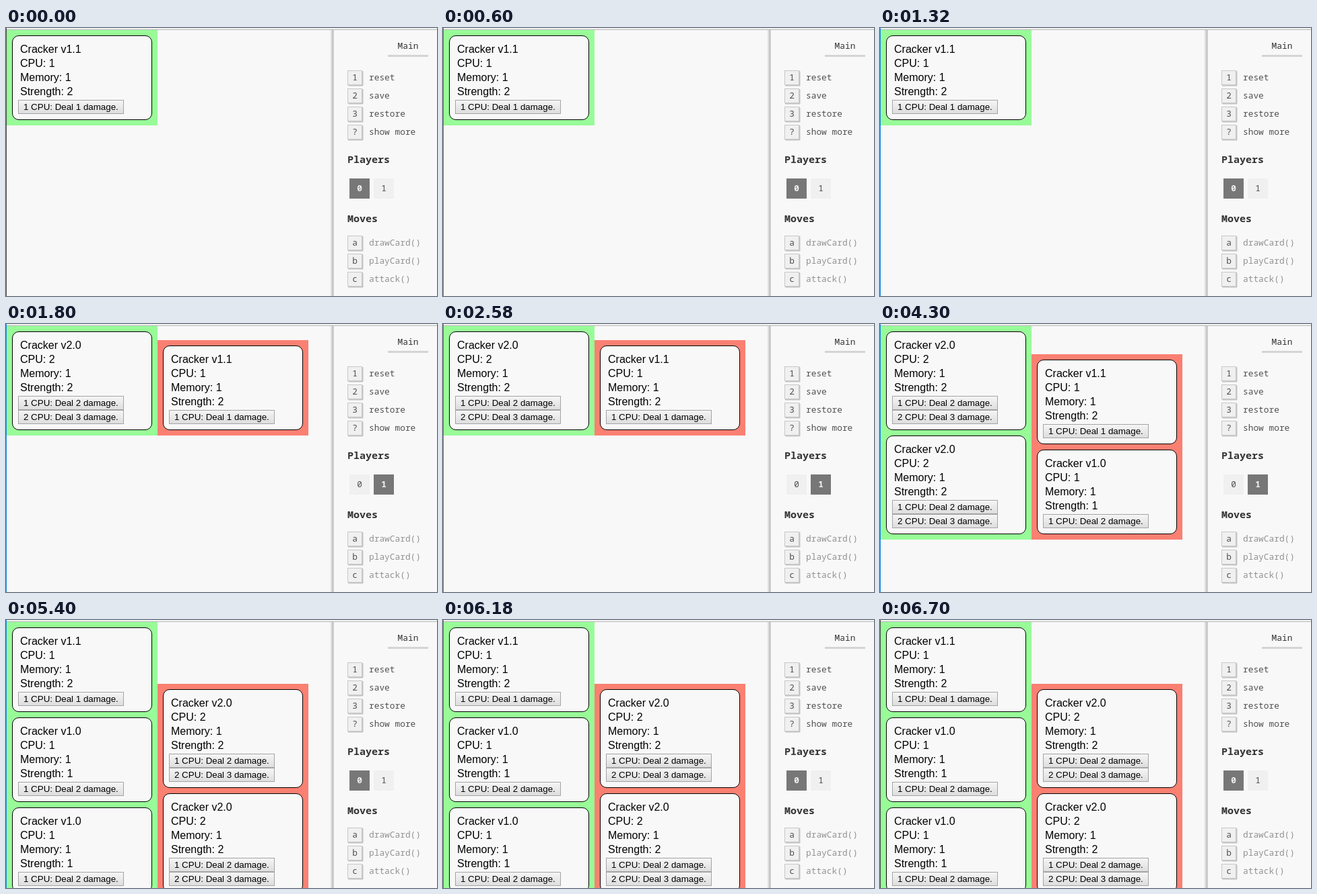
An HTML page for the animation above (7.4 s loop, 640 by 399 pixels).

```html
<!DOCTYPE html>
<html lang="en">
<head>
<meta charset="utf-8">
<title>Cracker card duel</title>
<style>
  html, body { margin: 0; width: 100%; height: 100%; overflow: hidden; background: #f8f8f8; }
  svg { display: block; position: absolute; left: 0; top: 0; }
  text { white-space: pre; }
  .card { font: 16px "Liberation Sans", Arial, sans-serif; fill: #000; }
  .btn { font: 13.333px "Liberation Sans", Arial, sans-serif; fill: #000; }
  .mono { font: 12.83px "Noto Sans Mono", monospace; fill: #505050; }
  .dim { fill: #929292; }
  .dark { fill: #333; }
  .mid { text-anchor: middle; }
  .head { font: bold 15px "Noto Sans Mono", monospace; fill: #333; }
  .on { font-weight: bold; fill: #f1f1f1; }
</style>
</head>
<body>
<svg width="640" height="399" viewBox="0 0 640 399">
  <defs>
    <linearGradient id="face" x2="0" y2="1">
      <stop stop-color="#f6f6f6"/><stop offset="1" stop-color="#dddddd"/>
    </linearGradient>
    <linearGradient id="shade">
      <stop stop-color="#f8f8f8"/><stop offset="1" stop-color="#bcbcbc"/>
    </linearGradient>
  </defs>
  <g id="board"></g>
  <g id="panel"></g>
  <g id="players"></g>
  <rect width="640" height="2" fill="#f2f2f2"/>
  <rect y="2" width="640" height="1" fill="#b8b8b8"/>
  <rect id="edge" width="1" height="399"/>
</svg>
<script>
const LOOP = 7400, TOP = 3, PAD = 8, COL = 224;
const GREEN = '#98fb98', SALMON = '#fa8072';
const DARK = '#484848', BLUE = '#1883d7';

// version: [cpu, strength, damage of each button]
const KINDS = {
  '1.0': [1, 1, [2]],
  '1.1': [1, 2, [1]],
  '2.0': [2, 2, [2, 3]]
};

// [start ms, edge colour, active player, left column, right column]
const STEPS = [
  [0, DARK, 0, ['1.1'], []],
  [600, BLUE, 0, ['1.1'], []],
  [1800, BLUE, 1, ['2.0'], ['1.1']],
  [3100, BLUE, 0, ['1.1', '1.0'], ['2.0']],
  [4300, BLUE, 1, ['2.0', '2.0'], ['1.1', '1.0']],
  [5400, BLUE, 0, ['1.1', '1.0', '1.0'], ['2.0', '2.0']],
  [6700, DARK, 0, ['1.1', '1.0', '1.0'], ['2.0', '2.0']]
];

const el = id => document.getElementById(id);
const rect = (x, y, w, h, fill, extra = '') =>
  `<rect x="${x}" y="${y}" width="${w}" height="${h}" fill="${fill}" ${extra}/>`;
const text = (x, y, cls, str) => `<text x="${x}" y="${y}" class="${cls}">${str}</text>`;

const cardHeight = v => 105 + 21 * KINDS[v][2].length;
const colHeight = list => list.reduce((sum, v) => sum + cardHeight(v) + PAD, PAD);

function card(x, y, v) {
  const [cpu, strength, hits] = KINDS[v];
  const lines = [`Cracker v${v}`, `CPU: ${cpu}`, 'Memory: 1', `Strength: ${strength}`];
  let out = rect(x + .5, y + .5, 207, cardHeight(v) - 1, '#f8f8f8', 'rx="9.5" stroke="#000"');
  lines.forEach((s, i) => out += text(x + 12, y + 26 + 21 * i, 'card', s));
  hits.forEach((hit, i) => {
    const top = y + 96 + 21 * i;
    out += rect(x + 9.5, top + .5, 156, 20, 'url(#face)', 'stroke="#a4a4a4"') +
      text(x + 17, top + 15, 'btn', `${i + 1} CPU: Deal ${hit} damage.`);
  });
  return out;
}

function column(x, bottom, list, color) {
  if (!list.length) return '';
  const h = colHeight(list);
  let y = bottom - h + PAD;
  let out = rect(x, bottom - h, COL, h, color);
  for (const v of list) {
    out += card(x + PAD, y, v);
    y += cardHeight(v) + PAD;
  }
  return out;
}

function keyRow(y, key, label, cls = '') {
  return rect(508, y - 10, 22.5, 22.5, '#c4c4c4', 'rx="1"') +
    rect(507.5, y - 10.5, 21, 21, '#f0f0f0', 'stroke="#c8c8c8"') +
    text(518, y + 4, 'mono mid', key) +
    text(539, y + 4, 'mono ' + cls, label);
}

function panel() {
  const menu = [['1', 'reset'], ['2', 'save'], ['3', 'restore'], ['?', 'show more']];
  const moves = [['a', 'drawCard()'], ['b', 'playCard()'], ['c', 'attack()']];
  return rect(481, 3, 5, 396, 'url(#shade)') +
    rect(486, 3, 1, 396, '#d4d4d4') +
    rect(487, 3, 153, 396, '#f8f8f8') +
    text(597, 31, 'mono dark mid', 'Main') +
    rect(567, 40, 60, 3, '#d4d4d4') +
    menu.map(([k, s], i) => keyRow(74 + 27 * i, k, s)).join('') +
    text(507, 201, 'head', 'Players') +
    text(507, 289, 'head', 'Moves') +
    moves.map(([k, s], i) => keyRow(320 + 27 * i, k, s, 'dim')).join('');
}

function players(active) {
  return [0, 1].map(i => {
    const x = 510 + 36 * i, on = i === active;
    return rect(x, 224, 30, 30, on ? '#777' : '#f0f0f0') +
      text(x + 15, 243, 'mono mid' + (on ? ' on' : ''), i);
  }).join('');
}

let shown = -1;
function draw(now) {
  const t = now % LOOP;
  const n = STEPS.filter(s => s[0] <= t).length - 1;
  if (n !== shown) {
    shown = n;
    const [, edge, active, left, right] = STEPS[n];
    const bottom = TOP + colHeight(left);
    el('board').innerHTML = column(1, bottom, left, GREEN) + column(1 + COL, bottom, right, SALMON);
    el('players').innerHTML = players(active);
    el('edge').setAttribute('fill', edge);
  }
}

el('panel').innerHTML = panel();
const start = performance.now();
function tick() {
  draw(performance.now() - start);
  requestAnimationFrame(tick);
}
tick();
</script>
</body>
</html>
```
